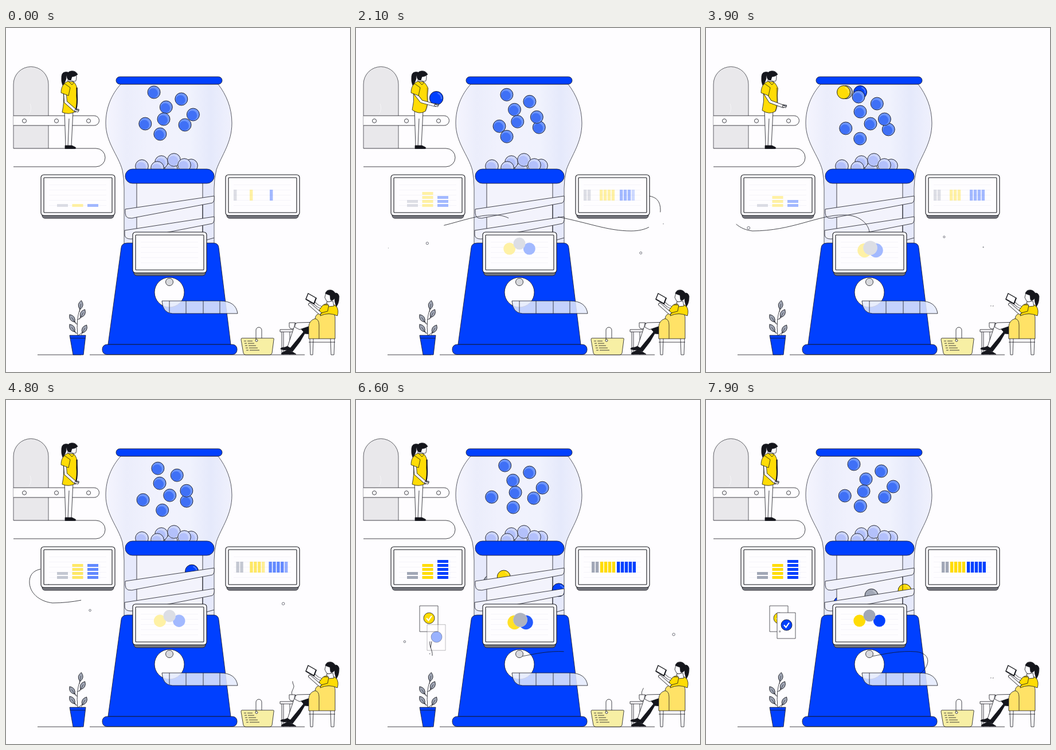
Recreate the animation shown at these times as an HTML page with a canvas. Size 600 by 600 pixels, loop 8000 ms.

```html
<!DOCTYPE html>
<html lang="en">
<head>
<meta charset="utf-8">
<title>Gumball machine</title>
<style>
html, body { margin: 0; width: 100%; height: 100%; overflow: hidden; background: #fefdff; }
canvas { display: block; width: 600px; height: 600px; }
</style>
</head>
<body>
<canvas id="stage"></canvas>
<script>
const LOOP = 8000, STEP = 100;
const INK = '#15161c', BLUE = '#0040ff', YELLOW = '#ffdc05', GRAY = '#a1a7b6', PAPER = '#fefdff';
const TRIO = [GRAY, YELLOW, BLUE];
const canvas = document.getElementById('stage');
const dpr = window.devicePixelRatio || 1;
canvas.width = canvas.height = 600 * dpr;
const g = canvas.getContext('2d');

const clamp = (v, a = 0, b = 1) => Math.min(b, Math.max(a, v));
const mix = (a, b, u) => a + (b - a) * u;
const ramp = (t, a, b) => clamp((t - a) / (b - a));
const smooth = u => u * u * (3 - 2 * u);
const ease = (t, a, b) => smooth(ramp(t, a, b));
const rand = n => { const s = Math.sin(n * 127.1 + 11.7) * 43758.5; return s - Math.floor(s); };

function paint(path, fill, stroke = INK, width = 0.8) {
  if (fill) { g.fillStyle = fill; g.fill(path); }
  if (stroke) { g.strokeStyle = stroke; g.lineWidth = width; g.stroke(path); }
}
const cache = {};
const shape = d => cache[d] || (cache[d] = new Path2D(d));
const draw = (d, fill, stroke, width) => paint(shape(d), fill, stroke, width);
const line = (d, width = 0.8, color = INK) => draw(d, null, color, width);

function disc(x, y, r, fill, stroke, width) {
  const p = new Path2D();
  p.arc(x, y, r, 0, 7);
  paint(p, fill, stroke, width);
}
function box(x, y, w, h, r, fill, stroke, width) {
  const p = new Path2D();
  p.roundRect(x, y, w, h, r);
  paint(p, fill, stroke, width);
}
function faded(alpha, fn) {
  if (alpha <= 0) return;
  g.save();
  g.globalAlpha *= alpha;
  fn();
  g.restore();
}
// strokes only the part of a path between fractions a and b
const lengths = {};
function trim(d, a, b, width = 0.8, color = INK) {
  if (b - a < 0.002) return;
  if (!lengths[d]) {
    const p = document.createElementNS('http://www.w3.org/2000/svg', 'path');
    p.setAttribute('d', d);
    lengths[d] = p.getTotalLength();
  }
  const n = lengths[d];
  g.setLineDash([0, a * n, (b - a) * n, n * 2]);
  line(d, width, color);
  g.setLineDash([]);
}
function limb(d, w, fill = PAPER) {
  g.lineJoin = g.lineCap = 'round';
  paint(shape(d), null, INK, w + 1.5);
  paint(shape(d), null, fill, w);
  g.lineJoin = 'miter';
  g.lineCap = 'butt';
}

function ball(x, y, base, shine, r = 11) {
  disc(x, y, r, shine, INK, 0.9);
  disc(x - 1.5, y + 1.6, r - 2.6, base, null);
}
function solidBall(x, y, color, r = 11.5) {
  disc(x, y, r, color, INK, 0.9);
  const arc = new Path2D();
  arc.arc(x, y, r * 0.75, -1.3, 0.2);
  paint(arc, null, 'rgba(255,255,255,.3)', 2);
}

// home x, y, sideways reach and phase of each floating ball
const FLOAT = [
  [262, 116, 4, 3], [274, 142, 6, 0.5], [302, 128, 4, 0.3], [281, 163, 6, 3.1],
  [315, 173, 5, 2.2], [319, 155, 8, -0.4], [243, 171, 7, 1.6], [269, 189, 6, -1.6]
];
function floating(t) {
  const turn = t / LOOP * Math.PI * 2;
  for (const [x, y, reach, phase] of FLOAT) {
    ball(x + reach * Math.cos(turn - phase), y - 4 * Math.cos(turn), '#3f70f6', '#6d95fc');
  }
}

// thrown from the balcony in an arc into the globe
function tossed(t) {
  [BLUE, GRAY, YELLOW].forEach((color, i) => {
    const u = (t - 3050 - i * 190) / (850 - i * 190);
    const y = mix(119, 112, u) - 400 * u * (1 - u);
    if (u >= 0 && y < 258) solidBall(mix(142, [269, 244, 240][i], Math.min(1, u)), y, color);
  });
}

// chute: leftwards in front of the column, back behind it, lower each lap
const FRONT = 1200, BACK = 850;
const START = [5280, 5770, 4530];
function rolling(t) {
  TRIO.forEach((color, i) => {
    const age = t - START[i];
    if (age < -BACK) return;
    const lap = Math.floor(age / (FRONT + BACK)), time = age - lap * (FRONT + BACK);
    const ahead = time < FRONT;
    const u = ahead ? time / FRONT : (time - FRONT) / BACK;
    const x = ahead ? mix(356, 214, u) : mix(214, 356, u);
    const y = 294 + lap * 37 + (ahead ? 21 * u : 21 + 16 * u);
    if (lap < 0 && x < 320) return;
    g.save();
    g.beginPath();
    if (ahead) g.rect(206, 271, 157, 110);
    else { g.rect(206, 271, 22, 110); g.rect(343, 271, 20, 110); }
    g.clip();
    solidBall(x, y, color);
    g.restore();
  });
}

const GLASS = 'M200 98C184 116 174 139 174 166C174 200 196 222 203 248Q206 262 206 280V376H363V280Q363 262 367 247C376 222 394 200 394 166C394 139 384 116 370 98Z';
const PILE = [[288, 247], [237, 241], [271, 234], [264, 244], [293, 230], [323, 240], [311, 239]];
const sheen = g.createLinearGradient(174, 0, 394, 0);
['#f5f5fe', '#ebedfb', '#f0f1fd', '#f1f2fd', '#f0f2fd', '#e5e9fb', '#f0f1fd']
  .forEach((c, i) => sheen.addColorStop(i / 6, c));

function machine(t) {
  draw(GLASS, sheen, '#30323c');
  tossed(t);
  floating(t);
  PILE.forEach(([x, y]) => ball(x, y, '#b3c0fb', '#ccd5fd', 11.3));
  box(192, 85, 185, 13, 6.5, BLUE);

  g.fillStyle = '#e6e9fb';
  g.fillRect(207, 265, 155, 110);
  g.fillStyle = '#f3f3fc';
  g.fillRect(228, 265, 115, 110);
  line('M228 271V375M343 271V375');
  rolling(t);
  draw('M208 316L363 293Q364 302 360 305L228 330Q208 336 208 323Z', '#f0f1fc');
  draw('M207 353L363 329Q364 338 360 341L232 366Q207 372 207 360Z', '#f0f1fc');
  line('M343 308V332M343 345V375M345 371L363 366');
  box(208, 246, 155, 25, 12.5, BLUE);

  draw('M212 375H362Q370 375 371 383L392 552H178L201 383Q202 375 212 375Z', BLUE);
  box(168, 552, 235, 17.5, 8, BLUE);
  disc(285, 461, 26, PAPER);
  disc(285, 443, 6.5, '#d9dade');
  draw('M272 476H373Q401 476 404 498H290Q273 497 272 476Z', 'rgba(229,234,253,.86)');
  line('M285 476V496M314 476V498M344 476V498M373 476V498');
  trim('M290 447C315 442 340 437 366 439C390 441 394 460 374 477', 0, ramp(t, 6100, 7000));
}

function screen(x, y) {
  box(x + 2, y + 5, 125, 71, 5, '#77787f');
  box(x, y, 129, 71, 5, PAPER, INK, 1.1);
  box(x + 5, y + 5, 119, 61, 1, PAPER, INK, 1.1);
  g.fillStyle = '#f5f4f9';
  for (let i = 1; i < 6; i++) g.fillRect(x + 14, y + 8 + i * 9, 100, 1);
}

// chart levels, one digit per beat
const BEATS = [0, 1300, 3000, 3900, 5200];
const ROWS = ['11312', '15334', '13425'], COLS = ['12222', '14434', '14345'];
function level(digits, t) {
  const i = Math.max(0, BEATS.findLastIndex(b => b <= t));
  return mix(+digits[i], +(digits[i + 1] || digits[i]), ramp(t, BEATS[i], BEATS[i + 1] || LOOP));
}
function bars(t) {
  const tone = mix(0.36, 1, ease(t, 4500, 5200)), pack = ease(t, 4500, 5300);
  TRIO.forEach((color, i) => {
    g.fillStyle = color;
    const rows = Math.round(level(ROWS[i], t)), cols = level(COLS[i], t);
    const left = mix([397, 425, 460][i], [411, 426, 455][i], pack);
    faded(tone, () => {
      for (let j = 0; j < rows; j++) g.fillRect(89 + i * 26.5, 307 - j * 7, 19, 5);
      for (let j = 0; j < cols; j++) {
        faded(clamp(cols - j), () => g.fillRect(left + j * 6.9, 282, 5.4, 19));
      }
    });
  });
}

// three drops that meet in the middle and part again
function drop(x, y, r, neck) {
  const p = new Path2D();
  p.arc(x, y, r, 0, 7);
  if (neck > 0.02) {
    const a = Math.atan2(392 - y, 285 - x), d = Math.hypot(285 - x, 392 - y) * neck;
    const at = (far, side) => [x + Math.cos(a) * far - Math.sin(a) * side, y + Math.sin(a) * far + Math.cos(a) * side];
    p.moveTo(...at(0, -r));
    p.quadraticCurveTo(...at(d * 0.6, -r * 0.75), ...at(d, -5));
    p.lineTo(...at(d, 5));
    p.quadraticCurveTo(...at(d * 0.6, r * 0.75), ...at(0, r));
    p.closePath();
  }
  return p;
}
function blobs(t) {
  const grow = ease(t, 350, 1000);
  if (!grow) return;
  const meet = at => ease(t, at - 1300, at) * (1 - ease(t, at, at + 1100));
  const near = meet(3900) + meet(6600);
  const neck = ease(t, 5300, 5600) * (1 - ease(t, 5800, 6200));
  const tone = mix(0.36, 1, ease(t, 5900, 6900));
  [1, 2, 0].forEach(i => {
    const a = (i * 2 / 3 + 0.5) * Math.PI, far = mix(20, 11.5, near);
    const x = 285 + near * 1.5 + Math.cos(a) * far, y = 394 - near + Math.sin(a) * far * (i ? 0.9 : 1);
    const p = drop(x, i ? y : 394 - near - far + 2, mix(10.5, 12.3, near) * grow, neck);
    paint(p, PAPER, null);
    faded(tone, () => paint(p, TRIO[[0, 1, 2][i]], null));
  });
}

const RIGHT = 'M286 355C290 336 310 325 338 327C400 337 435 354 480 354C515 354 531 335 531 318C531 302 524 295 511 293';
const LEFT = 'M285 356C284 345 272 326 240 326C195 326 150 354 81 354C62 352 43 340 41 320C40 307 46 298 60 295';
function wires(t) {
  const pulse = (path, start, lag, span) =>
    trim(path, ramp(t, start + lag, start + lag + span), ramp(t, start, start + span));
  pulse(RIGHT, 100, 950, 1200);
  pulse(RIGHT, 1180, 620, 1200);
  pulse(LEFT, 1320, 610, 1650);
  pulse(LEFT, 2570, 1330, 1650);
}

// a card floats up, then gets its tick
function card(t, start, x, y, color) {
  faded(ramp(t, start, start + 400), () => {
    const top = y + 32 * (1 - ease(t, start - 200, start + 700));
    box(x, top, 32, 45, 0, PAPER, '#33343a', 0.8);
    disc(x + 16.5, top + 21.5, 9.5, color, INK, 0.8);
    g.save();
    g.translate(x + 16.5, top + 21.5);
    trim('M-4.5 0L-1 4L4.5 -4', 0, ease(t, start + 600, start + 1000), 2.2, '#fff');
    g.restore();
  });
}
function cards(t) {
  card(t, 5150, 111, 359, YELLOW);
  card(t, 6440, 124, 371, BLUE);
  trim('M129 421C127 430 134 436 133 446M132 421L130 432', ramp(t, 6600, 6950), ramp(t, 6350, 6600));
}

function balcony() {
  draw('M13 210V98A30.5 30.5 0 0 1 74 98V210', '#e9e8eb', '#3a3b42');
  line('M40 150Q46 142 42 132', 0.8, '#f6f5f8');
  draw('M13 153H154A8.5 8.5 0 0 1 154 170H13', PAPER);
  draw('M13 210H157A16 16 0 0 1 157 242H13', PAPER);
  [32, 88, 144].forEach(x => disc(x, 162, 3.5, PAPER));
}

function keeper(t) {
  const k = ease(t, 1500, 2300) * (1 - ease(t, 3400, 4700));
  const hx = mix(121, 141, k), hy = mix(144, 133, k);
  draw('M102 143L104 206H114L117 143Z', PAPER);
  line('M110 158L108 206');
  draw('M103 205H115L121 208Q123 210 120 210.5H103Z', INK);
  draw('M108 88L108 98L118 98L117 92Z', PAPER);
  draw('M111 77L122 79L123 86L122 92Q118 95 112 90Z', PAPER);
  draw('M125 81Q121 74 114 75Q106 76 106 85Q108 92 113 91L115 85Q120 85 125 81Z', INK);
  draw('M108 77Q98 75 97 84Q96 94 99 100Q104 93 105 88Q104 83 108 81Z', INK);
  const front = mix(124, 126, k);
  paint(new Path2D(`M108 93L102 96Q99 100 100 112Q102 128 98 ${mix(147, 142, k)}Q110 152 121 ${mix(146, 145, k)}Q${front + 1} 134 ${front - 1} 118L${front} 105Q121 95 117 94Z`), YELLOW);
  faded(1 - k, () => line('M123.5 104L124 125Q124 138 121 145', 2.2));
  line('M109 93L115 99L119 95');
  const size = ease(t, 850, 1150);
  if (size && t < 3050) solidBall(mix(130, 142, k), mix(140, 119, k), BLUE, 11.8 * size);
  limb(`M${hx - 3} ${hy - 2}L${hx + 5} ${hy - 1}`, 2, GRAY);
  limb(`M103 114L${mix(104, 116, k)} ${mix(129, 128, k)}L${hx} ${hy}`, 4);
  limb(`M${hx} ${hy}L${hx + 4} ${hy + 1}`, 2);
  draw('M102 97Q96 102 96 113L109 118L112 104Z', YELLOW);
}

function leaf(x, y, angle) {
  g.save();
  g.translate(x, y);
  g.rotate(angle);
  draw('M0 0Q-8 -8 0 -16Q8 -8 0 0Z', GRAY);
  line('M0 4V-10', 0.6);
  g.restore();
}
function room() {
  line('M55 570H131M146 570H521');
  line('M125 536Q122 508 129 490M124 517L120 512M125 509L130 505M124 533L120 529M125 537L133 531');
  leaf(129, 491, 0.15);
  leaf(120, 513, -0.6);
  leaf(130, 505, 0.5);
  leaf(120, 530, -0.6);
  leaf(133, 532, 0.5);
  draw('M111 536H139L135 570H117Z', BLUE);
  line('M112 541H138');

  draw('M411 541H466Q468 541 467 544L464 567Q463 570 460 570H418Q415 570 414 567L410 544Q410 541 411 541Z', '#f7efa4');
  line('M436 545V527A5 5 0 0 1 446 527V541');
  disc(437, 545, 2, PAPER);
  for (let i = 0; i < 5; i++) line(`M${415 + i} ${546 + i * 4}h4m2 0h${9 + i * 2}`);
}

const WISP = 'M499 514C496 507 505 502 501 496C499 491 500 488 501 484';
const WISP2 = 'M498 510C494 504 501 499 498 494C496 490 497 487 497 484';
function reader(t) {
  draw('M478 526H503V530H478Z', PAPER);
  line('M481 530V570M484 530V570M495 530V570');
  draw('M494 514H504V521Q503 525 499 525Q495 525 494 521Z', PAPER);
  line('M504 516Q508 517 504 521');

  const sway = ease(t, 2200, 2800) * (1 - ease(t, 3200, 3800));
  draw('M546 517L512 519L503 547L490 562L500 564L513 547L521 533L546 535Z', INK);
  draw('M490 562L500 565L506 569H481Q479 567 484 565Z', INK);
  g.save();
  g.translate(515, 518);
  g.rotate(sway * 0.05);
  draw('M-10 -4L-24 38L-19 40L4 12Z', PAPER);
  draw('M-24 37L-19 41Q-25 46 -36 42Q-36 39 -29 39Z', INK);
  g.restore();
  draw('M548 513L508 514Q503 516 504 522L512 526L530 520L550 523Z', PAPER);

  draw('M528 541V520Q529 510 539 507Q540 498 549 498H569Q574 499 574 505V542H528Z', '#ffe267');
  line('M539 507Q546 508 546 518V542M528 548H574M530 542L531 570H535L536 542M566 542L567 570H572L573 542');
  draw('M555 482Q566 478 576 485Q581 492 578 502Q563 495 548 502L550 494Z', YELLOW);
  draw('M559 478L570 476L572 485L562 486Z', PAPER);
  draw('M558 462L556 470L559 476Q564 480 569 474V460Z', PAPER);
  draw('M557 463Q559 456 567 457Q576 459 574 469Q571 477 566 474L565 466Q561 465 557 463Z', INK);
  draw('M572 463Q579 460 581 468Q581 480 576 486Q573 478 573 471Z', INK);
  limb('M556 490L547 497L530 482', 4);
  limb('M554 489L544 485L537 479', 3);
  draw('M553 483L563 483L561 494L550 497L546 492Z', YELLOW);
  draw('M527 463L541 471L537 481L523 473Z', PAPER, INK, 1.4);
  line('M523 473L537 481L541 471', 2);

  const q = ((t + 1600) % 2000) / 1550;
  trim(WISP, ramp(q, 0.4, 1), ramp(q, 0, 0.33));
  trim(WISP2, ramp(q, 0.4, 1), ramp(q, 0.4, 0.55));
}

// small rings that swell, rise and vanish on both sides of the machine
function specks(t) {
  for (let i = 0; i < 12; i++) {
    const dt = t - 1300 - i * 550, size = 2.9 * (1 - Math.abs(dt) / 900);
    if (size <= 0) continue;
    const x = (i % 2 ? 45 : 410) + rand(i) * (i % 2 ? 120 : 170);
    disc(x, 340 + rand(i + 40) * 95 - dt * 0.03, size, PAPER, '#4b4d58', 0.8);
  }
}

function frame() {
  const t = Math.floor((performance.now() % LOOP) / STEP) * STEP;
  g.setTransform(dpr, 0, 0, dpr, 0, 0);
  g.fillStyle = PAPER;
  g.fillRect(0, 0, 600, 600);
  balcony();
  room();
  machine(t);
  keeper(t);
  wires(t);
  [[61, 256], [383, 256], [221, 356]].forEach(p => screen(...p));
  bars(t);
  blobs(t);
  cards(t);
  reader(t);
  specks(t);
  requestAnimationFrame(frame);
}
frame();
</script>
</body>
</html>
```
